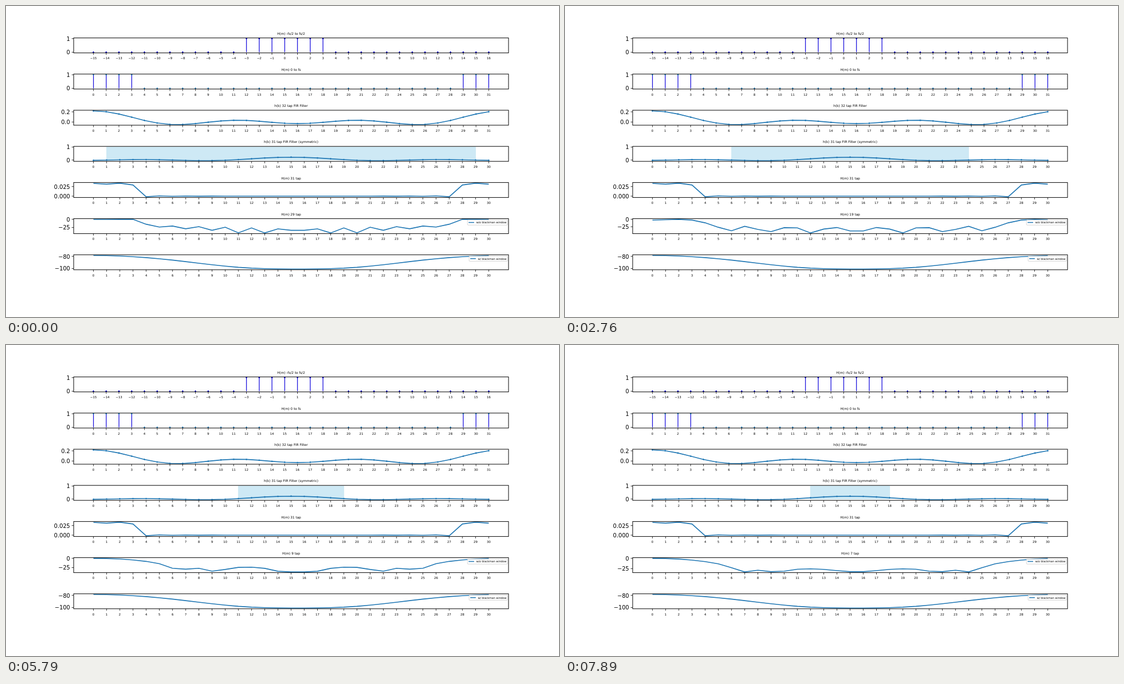
An HTML page with a canvas that plays this animation: 997 px wide and 561 px high, repeating every 8000 ms.

```html
<!DOCTYPE html>
<html>
<head>
<meta charset="utf-8">
<style>
html, body { margin: 0; width: 100%; height: 100%; overflow: hidden; background: #fff; }
canvas { display: block; }
</style>
</head>
<body>
<canvas id="stage" width="997" height="561"></canvas>
<script>
const ctx = document.getElementById('stage').getContext('2d');
const LEFT = 122, WIDTH = 784, HEIGHT = 27, BLUE = '#1f77b4';
const LOOP = 8000;
const STEPS = [0, 750, 1290, 1770, 2280, 2760, 3120, 3810, 4200, 4650, 5340, 5850, 6360, 6870, 7320, 7680];

const series = (n, f) => Array.from({ length: n }, (_, i) => f(i));
const decibel = v => 20 * Math.log10(v);

// Impulse response of an ideal low pass that keeps `band` of 32 bins
const impulse = (k, band = 7) => k
  ? Math.sin(band * Math.PI * k / 32) / (32 * Math.sin(Math.PI * k / 32))
  : band / 32;

// Real 31 point spectrum of a symmetric filter
const spectrum = (half, tap) => series(31, m => {
  let sum = tap(0);
  for (let k = 1; k <= half; k++) sum += 2 * tap(k) * Math.cos(2 * Math.PI * m * k / 31);
  return sum;
});

const centred = series(32, i => +(i >= 12 && i <= 18));
const wrapped = series(32, i => +(i < 4 || i > 28));
const taps32 = series(32, k => impulse(k));
const taps31 = series(31, i => impulse(i - 15));
const spectrum31 = spectrum(15, k => impulse(k)).map(v => v / 31);

// Shorter filters get a lower offset and a higher noise floor
function response(taps) {
  const offset = 1.6 / taps ** 2, floor = Math.max(1 / taps ** 2, .005);
  const tap = k => impulse(k, 7.5) - offset + (k ? 0 : .025);
  const values = spectrum((taps - 1) / 2, tap);
  const peak = Math.max(...values);
  return values.map(v => Math.min(0, decibel(Math.hypot(v / peak, floor))));
}

// Gaussian main lobe above a flat floor
function windowed(taps) {
  const lobe = taps < 7 ? .03 : 0;
  return series(31, i => {
    const m = Math.min(i, 31 - i);
    return decibel(Math.abs(Math.exp(-m * m / 36) - lobe) + .08) - 79.2;
  });
}

function text(str, x, y, size, align = 'center') {
  ctx.font = `${size}px "DejaVu Sans", sans-serif`;
  ctx.textAlign = align;
  ctx.fillStyle = '#000';
  ctx.fillText(str, x, y + size * .365);
}

function line(points, color, width) {
  ctx.strokeStyle = color;
  ctx.lineWidth = width;
  ctx.beginPath();
  points.forEach(([x, y]) => ctx.lineTo(x, y));
  ctx.stroke();
}

function dot([x, y], color) {
  ctx.fillStyle = color;
  ctx.beginPath();
  ctx.arc(x, y, 1.4, 0, 7);
  ctx.fill();
}

function legend(label, top, left) {
  ctx.beginPath();
  ctx.roundRect(left, top + 2.4, 904 - left, 9.2, 1);
  ctx.fillStyle = 'rgba(255,255,255,.8)';
  ctx.fill();
  ctx.strokeStyle = '#ccc';
  ctx.lineWidth = .8;
  ctx.stroke();
  line([[left + 2, top + 6.9], [left + 12, top + 6.9]], BLUE, 1.5);
  text(label, 902.3, top + 6.9, 4.95, 'right');
}

function panel(row, title, data, ticks, { first = 0, max = Math.max(...data), stem, dots, span, label, labelLeft } = {}) {
  const top = 57.6 + 65.2 * row, bottom = top + HEIGHT;
  const min = Math.min(...data), inner = HEIGHT / 1.1;
  const px = i => LEFT + WIDTH / 22 + i * WIDTH / 1.1 / (data.length - 1);
  const py = v => top + HEIGHT / 22 + (max - v) / (max - min) * inner;
  const points = data.map((v, i) => [px(i), py(v)]);

  if (span) {
    const box = [px(15 - span), py(1), px(15 + span) - px(15 - span), py(0) - py(1)];
    ctx.fillStyle = '#cee9f5';
    ctx.fillRect(...box);
    ctx.strokeStyle = '#bfe1ef';
    ctx.lineWidth = .7;
    ctx.strokeRect(...box);
  }
  if (stem) points.forEach(([x, y], i) => data[i] && line([[x, py(0)], [x, y]], '#1a10dc', 1.3));
  else line(points, BLUE, 1.6);
  if (dots) points.forEach(p => dot(p, dots));

  ctx.strokeStyle = '#000';
  ctx.lineWidth = 1;
  ctx.strokeRect(LEFT, top, WIDTH, HEIGHT);
  points.forEach(([x], i) => {
    line([[x, bottom], [x, bottom + 3.5]], '#000', .8);
    text(String(first + i).replace('-', '−'), x, bottom + 9.8, 5.6);
  });
  ticks.forEach(str => {
    const y = py(+str);
    line([[LEFT - 3.5, y], [LEFT, y]], '#000', .8);
    text(str.replace('-', '−'), LEFT - 6.5, y + .2, 10.1, 'right');
  });
  text(title, LEFT + WIDTH / 2, top - 8, 5.9);
  if (label) legend(label, top, labelLeft);
}

function draw(time) {
  const step = STEPS.filter(t => t <= time).length - 1;
  const taps = 3 + 2 * Math.abs(13 - step);

  ctx.fillStyle = '#fff';
  ctx.fillRect(0, 0, 997, 561);
  panel(0, 'H(m) -fs/2 to fs/2', centred, ['0', '1'], { first: -15, stem: true, dots: '#0c08c0' });
  panel(1, 'H(m) 0 to fs', wrapped, ['0', '1'], { stem: true, dots: BLUE });
  panel(2, 'h(k) 32 tap FIR Filter', taps32, ['0.0', '0.2'], { dots: BLUE });
  panel(3, 'h(k) 31 tap FIR Filter (symmetric)', taps31, ['0', '1'], { max: 1, dots: BLUE, span: (taps - 1) / 2 });
  panel(4, 'H(m) 31 tap', spectrum31, ['0.000', '0.025']);
  panel(5, `H(m) ${taps} tap`, response(taps), taps > 3 ? ['0', '-25'] : ['0', '-10'],
    { label: 'w/o blackman window', labelLeft: 832 });
  panel(6, '', windowed(taps), ['-80', '-100'],
    { label: 'w/ blackman window', labelLeft: 835 });
}

function tick() {
  draw(performance.now() % LOOP);
  requestAnimationFrame(tick);
}
tick();
</script>
</body>
</html>
```
